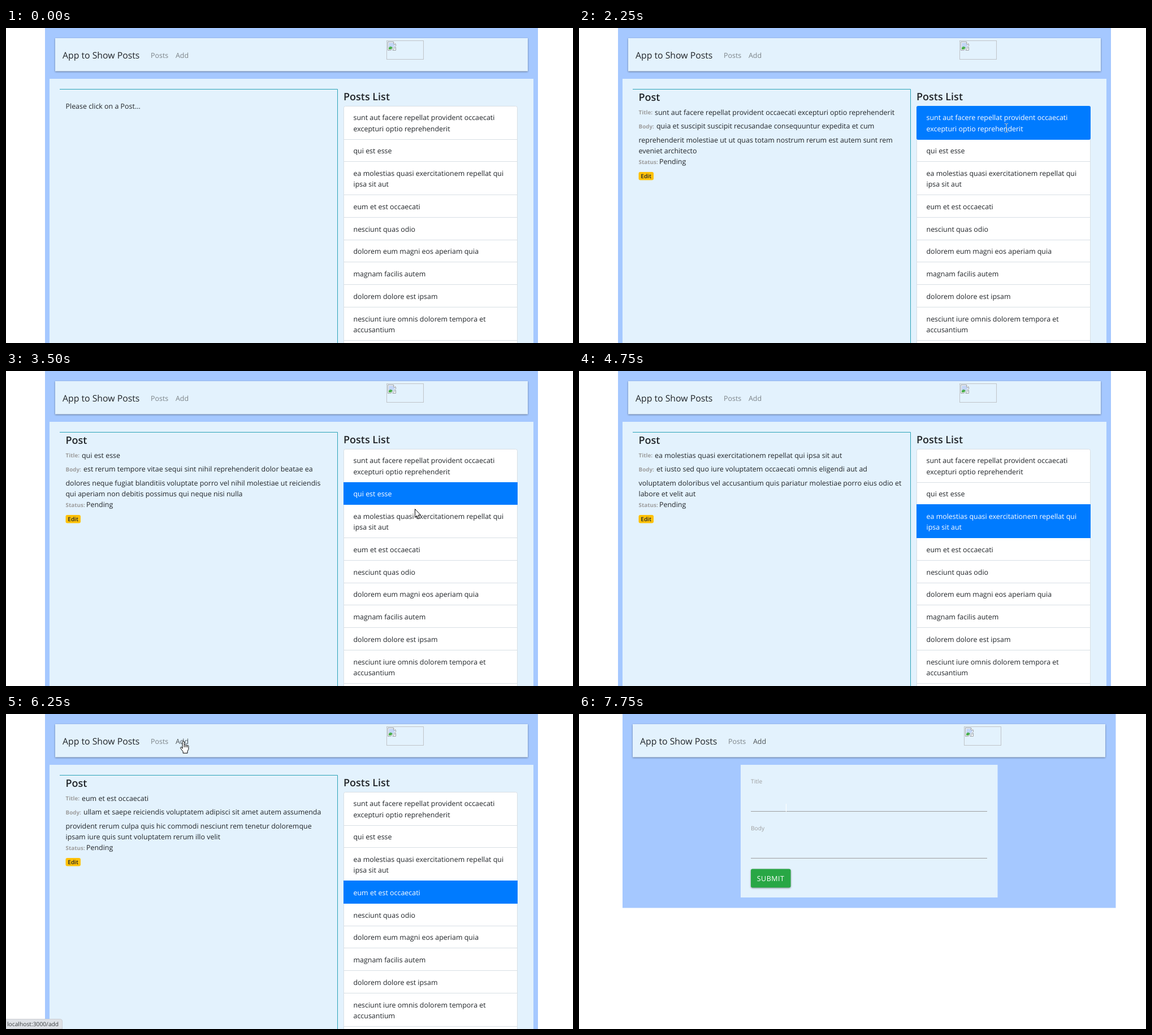
Animation of 1003x558 px, one loop 8000 ms. Source, as an HTML page:

```html
<!DOCTYPE html>
<html lang="en">
<head>
<meta charset="utf-8">
<title>App to Show Posts</title>
<style>
html, body { margin: 0; width: 100%; height: 100%; overflow: hidden; background: #fff; }
svg { display: block; width: 1003px; height: 558px; }
text { font: 12.45px "Open Sans", "Noto Sans", sans-serif; fill: #212529; text-rendering: geometricPrecision; white-space: pre; }
.brand { font-size: 15.8px; }
.head { font-size: 18px; font-weight: 600; }
.link { fill: #7c8388; }
.label { font-size: 9.9px; font-weight: 700; fill: #9e9e9e; }
.field { font-size: 10.2px; fill: #9e9e9e; }
.edit { font-size: 10px; font-weight: 600; }
.submit { fill: #fff; letter-spacing: .55px; }
.url { font-size: 10.25px; fill: #3c4043; }
.sky { fill: #a5c8ff; }
.panel { fill: #e3f2fd; }
.raised { filter: drop-shadow(0 1px 1.5px rgba(0, 0, 0, .42)); }
.active rect { fill: #007bff; }
.active text { fill: #fff; }

/* every change is a hard cut on an 8 s loop */
.t { animation: 8s step-end infinite; }
.list-page { animation-name: list-page; }
.form-page { animation-name: form-page; }
.nav { animation-name: nav; }
.add { animation-name: add; }
.empty { animation-name: empty; }
.post { animation-name: post; }
.post1 { animation-name: post1; }
.post2 { animation-name: post2; }
.post3 { animation-name: post3; }
.post4 { animation-name: post4; }
.status { animation-name: status; }
.cursor { animation-name: cursor; }
.arrow { animation-name: arrow; }
.hand { animation-name: hand; }
.beam { animation-name: beam; }
.beam-light { animation-name: beam-light; }
.caret { animation-name: caret; }

@keyframes list-page { 0% { opacity: 1 } 81.25%, 100% { opacity: 0 } }
@keyframes form-page { 0% { opacity: 0 } 81.25%, 100% { opacity: 1 } }
@keyframes nav { 0% { transform: none } 81.25%, 100% { transform: translate(8px, 0) } }
@keyframes add { 0% { fill: #7c8388 } 75%, 100% { fill: #4c5256 } }
@keyframes empty { 0% { opacity: 1 } 25%, 100% { opacity: 0 } }
@keyframes post { 0% { opacity: 0 } 25%, 100% { opacity: 1 } }
@keyframes post1 { 0% { opacity: 0 } 25% { opacity: 1 } 37.5%, 100% { opacity: 0 } }
@keyframes post2 { 0% { opacity: 0 } 37.5% { opacity: 1 } 53.125%, 100% { opacity: 0 } }
@keyframes post3 { 0% { opacity: 0 } 53.125% { opacity: 1 } 65.625%, 100% { opacity: 0 } }
@keyframes post4 { 0% { opacity: 0 } 65.625%, 100% { opacity: 1 } }
@keyframes status { 0% { opacity: 0 } 78.125% { opacity: 1 } 87.5%, 100% { opacity: 0 } }
@keyframes cursor {
  0%, 15.625% { transform: translate(735px, 252px) }
  18.75% { transform: translate(742px, 225px) }
  21.875% { transform: translate(756px, 177px) }
  31.25% { transform: translate(745px, 200px) }
  34.375% { transform: translate(732px, 220px) }
  37.5% { transform: translate(728px, 225px) }
  40.625% { transform: translate(725px, 231px) }
  43.75% { transform: translate(723px, 244px) }
  46.875% { transform: translate(721px, 260px) }
  50% { transform: translate(720px, 274px) }
  56.25% { transform: translate(718px, 314px) }
  62.5% { transform: translate(718px, 322px) }
  68.75% { transform: translate(640px, 250px) }
  71.875% { transform: translate(420px, 130px) }
  75% { transform: translate(313px, 48px) }
  87.5% { transform: translate(330px, 88px) }
  90.625% { transform: translate(350px, 130px) }
  93.75%, 100% { transform: translate(366px, 166px) }
}
@keyframes arrow {
  0% { opacity: 0 } 15.625% { opacity: 1 } 21.875% { opacity: 0 } 31.25% { opacity: 1 }
  59.375% { opacity: 0 } 62.5% { opacity: 1 } 75% { opacity: 0 } 87.5% { opacity: 1 } 93.75%, 100% { opacity: 0 }
}
@keyframes hand { 0% { opacity: 0 } 75% { opacity: 1 } 87.5%, 100% { opacity: 0 } }
@keyframes beam { 0% { opacity: 0 } 21.875% { opacity: 1 } 25% { opacity: 0 } 93.75% { opacity: 1 } 96.875%, 100% { opacity: 0 } }
@keyframes beam-light { 0% { opacity: 0 } 25% { opacity: 1 } 31.25%, 100% { opacity: 0 } }
@keyframes caret { 0% { opacity: 0 } 96.875%, 100% { opacity: 1 } }
</style>
</head>
<body>
<svg viewBox="0 0 1003 558">
  <defs>
    <path id="ibeam" d="M-3 -7.5H-1.5L0 -6.5 1.5 -7.5H3M0 -6.5V6.5M-3 7.5H-1.5L0 6.5 1.5 7.5H3" fill="none"/>
  </defs>

  <g class="t list-page">
    <rect class="sky" x="69" width="872" height="558"/>
    <rect class="panel" x="77" y="90" width="856" height="468"/>
    <path d="M95 108.5H586.5V558" fill="none" stroke="#2ba3b8"/>
    <text class="t empty" x="105.5" y="142.6">Please click on a Post...</text>
    <g class="t post">
      <text class="head" x="105.5" y="128.6">Post</text>
      <text class="label" x="105.5" y="153.3">Title:</text>
      <text class="label" x="105.5" y="178">Body:</text>
      <text class="label" x="105.5" y="240.8">Status:</text>
      <text x="142" y="241">Pending</text>
      <rect x="105.5" y="255" width="26.5" height="14.5" rx="3" fill="#ffc107"/>
      <text class="edit" x="109.3" y="266">Edit</text>
    </g>
    <text class="head" x="597" y="127.6">Posts List</text>
    <path d="M597.5 558V141.5a3 3 0 0 1 3-3H901.5a3 3 0 0 1 3 3V558" fill="#fff" stroke="#d8dfe5"/>
    <g id="list"></g>
    <g id="posts"></g>
  </g>

  <g class="t form-page">
    <rect class="sky" x="77" width="872.5" height="343.5"/>
    <rect class="panel" x="286" y="90" width="454.5" height="235"/>
    <text class="field" x="304" y="122.6">Title</text>
    <text class="field" x="304" y="205.6">Body</text>
    <path d="M304 172.5H722M304 255.5H722" stroke="#9e9e9e"/>
    <rect class="raised" x="304" y="274.5" width="70.5" height="33" rx="3" fill="#28a745"/>
    <text class="submit" x="314.7" y="296.2">SUBMIT</text>
  </g>

  <g class="t nav">
    <rect class="panel raised" x="87" y="18" width="836" height="58.5"/>
    <text class="brand" x="100" y="53.6">App to Show Posts</text>
    <text class="link" x="256" y="52.6">Posts</text>
    <text class="link t add" x="300" y="52.6">Add</text>
    <rect x="673.5" y="22.5" width="65" height="33" fill="none" stroke="#c0c4c8"/>
    <g transform="translate(675 24)">
      <path d="M.5 .5H10.5L14.5 4.5V8L10 11.5 6 15.5H.5z" fill="#fff" stroke="#9aa0a6"/>
      <path d="M2 2H10V5H13V7.5L8 12H2z" fill="#c3d5f5"/>
      <path d="M2 14V11Q5 6.5 9 11L6 14z" fill="#4caf50"/>
      <path d="M10.5 .5V4.5H14.5" fill="#fff" stroke="#9aa0a6"/>
      <path d="M14.5 10V15.5H9z" fill="#fff" stroke="#9aa0a6"/>
    </g>
  </g>

  <g class="t status">
    <path d="M0 540.5H96a3.5 3.5 0 0 1 3.5 3.5V558H0z" fill="#dee1e6" stroke="#cbced3"/>
    <text class="url" x="2" y="553.2">localhost:3000/add</text>
  </g>

  <g class="t cursor">
    <path class="t arrow" d="M.5 .5V15.3L3.8 12.2 6.2 17.8 8.7 16.7 6.3 11.2H10.6z" fill="#fff" stroke="#000"/>
    <g class="t hand" fill="#fff" stroke="#000" stroke-linejoin="round">
      <path d="M-.9 13.2V1.8a1.6 1.6 0 0 1 3.2 0V7a1.5 1.5 0 0 1 2.7 .3 1.5 1.5 0 0 1 2.5 .6 1.4 1.4 0 0 1 2.4 1.2V14.5L8 18V21.3H.2V18.6L-4.3 12.6a1.4 1.4 0 0 1 2-1.8z"/>
      <path d="M2.3 7V11M5 7.5V11M7.5 8.2V11" fill="none"/>
    </g>
    <use class="t beam" href="#ibeam" stroke="#333"/>
    <use class="t beam-light" href="#ibeam" stroke="#e6cbb0"/>
    <path class="t caret" d="M.5 -7V7" stroke="#fff"/>
  </g>
</svg>
<script>
const titles = [
  ["sunt aut facere repellat provident occaecati", "excepturi optio reprehenderit"],
  ["qui est esse"],
  ["ea molestias quasi exercitationem repellat qui", "ipsa sit aut"],
  ["eum et est occaecati"],
  ["nesciunt quas odio"],
  ["dolorem eum magni eos aperiam quia"],
  ["magnam facilis autem"],
  ["dolorem dolore est ipsam"],
  ["nesciunt iure omnis dolorem tempora et", "accusantium"]
];
const bodies = [
  ["quia et suscipit suscipit recusandae consequuntur expedita et cum",
   "reprehenderit molestiae ut ut quas totam nostrum rerum est autem sunt rem",
   "eveniet architecto"],
  ["est rerum tempore vitae sequi sint nihil reprehenderit dolor beatae ea",
   "dolores neque fugiat blanditiis voluptate porro vel nihil molestiae ut reiciendis",
   "qui aperiam non debitis possimus qui neque nisi nulla"],
  ["et iusto sed quo iure voluptatem occaecati omnis eligendi aut ad",
   "voluptatem doloribus vel accusantium quis pariatur molestiae porro eius odio et",
   "labore et velit aut"],
  ["ullam et saepe reiciendis voluptatem adipisci sit amet autem assumenda",
   "provident rerum culpa quis hic commodi nesciunt rem tenetur doloremque",
   "ipsam iure quis sunt voluptatem rerum illo velit"]
];

const line = (x, y, s) => `<text x="${x}" y="${y}">${s}</text>`;
let list = "", posts = "", rowTop = 138;

titles.forEach((lines, i) => {
  const next = rowTop + (lines.length > 1 ? 59 : 39.7);
  const y = Math.floor(rowTop), end = Math.floor(next);
  const label = lines.map((s, k) => line(614.5, rowTop + 25.3 + k * 19.2, s)).join("");
  list += `${label}<path d="M597 ${end + .5}H905" stroke="#d8dfe5"/>`;

  if (bodies[i]) {
    const [first, second, third] = bodies[i];
    posts += `<g class="t post${i + 1}">
      <g class="active"><rect x="597" y="${y}" width="308" height="${end - y + 1}" rx="${i ? 0 : 3}"/>${label}</g>
      ${line(134, 153.6, lines.join(" "))}${line(137, 178.2, first)}
      ${line(105.5, 202.6, second)}${line(105.5, 221.6, third)}</g>`;
  }
  rowTop = next;
});
document.getElementById("list").innerHTML = list;
document.getElementById("posts").innerHTML = posts;
</script>
</body>
</html>
```
